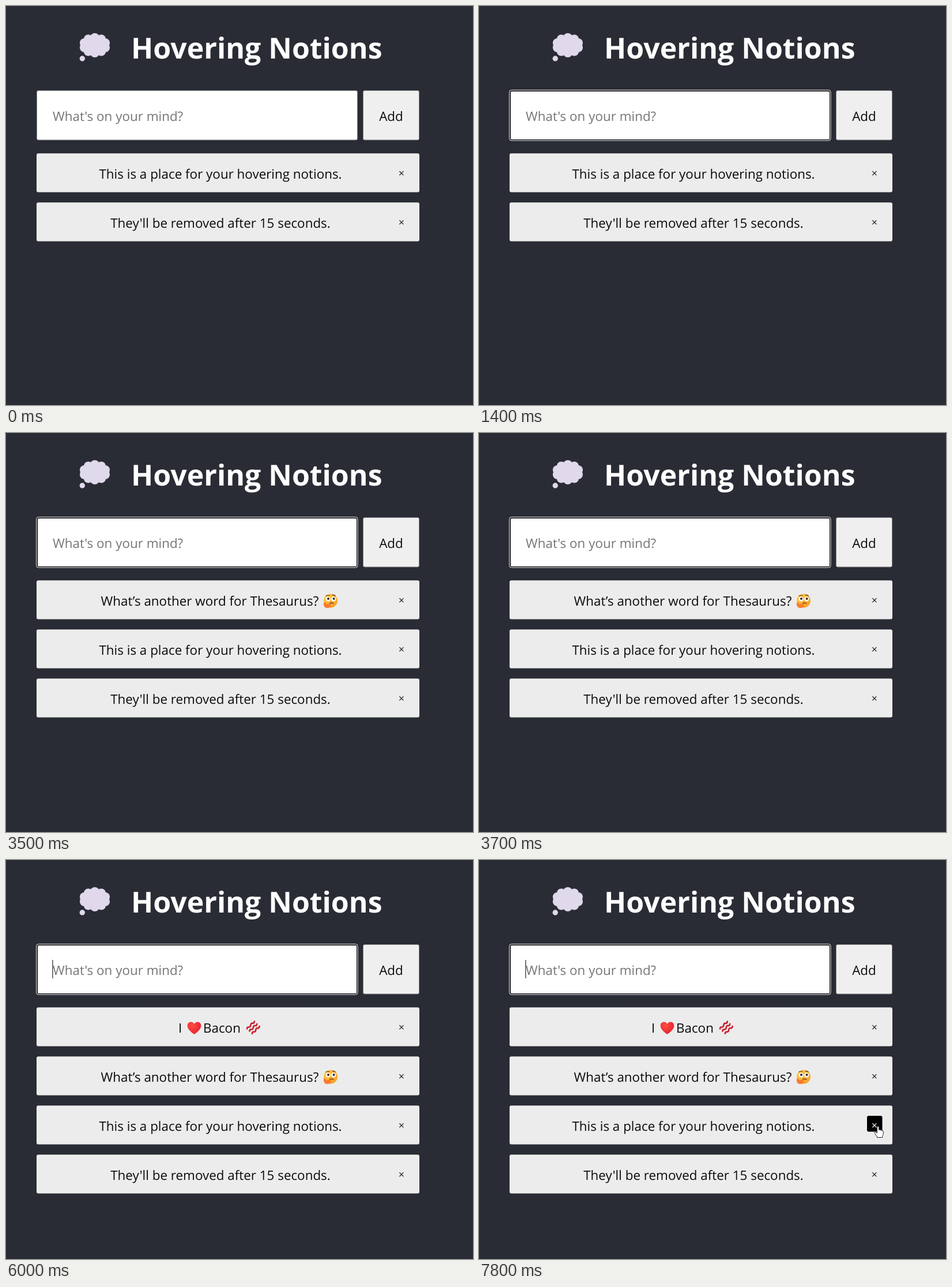
Recreate the animation shown at these times as an HTML page. Size 810 by 691 pixels, loop 8 s.

```html
<!DOCTYPE html>
<html lang="en">
<head>
<meta charset="utf-8">
<title>Hovering Notions</title>
<style>
  html, body { margin: 0; width: 100%; height: 100%; overflow: hidden; background: #2a2c35; }
  svg { display: block; width: 100%; height: 100%; }
  text { font: 22.4px "Open Sans", "Noto Sans", sans-serif; fill: #0b0b0b; text-rendering: geometricPrecision; white-space: pre; }
  .title { font-size: 50px; font-weight: 700; fill: #fff; }
  .hint { fill: #757575; }
  .mid { text-anchor: middle; }
  .close { font-size: 18px; fill: #222; text-anchor: middle; }
  .edge { stroke: #85858a; }
</style>
</head>
<body>
<svg viewBox="0 0 810 691">
  <defs>
    <linearGradient id="skin" x1="0" y1="0" x2="1" y2="1">
      <stop offset="0" stop-color="#ffcf45"/>
      <stop offset="1" stop-color="#f99a24"/>
    </linearGradient>
    <radialGradient id="red" cx=".35" cy=".3" r=".8">
      <stop offset="0" stop-color="#ff4a43"/>
      <stop offset="1" stop-color="#e3202c"/>
    </radialGradient>
    <!-- emoji are centred on 0,0 -->
    <g id="thinking">
      <circle r="12" fill="url(#skin)"/>
      <circle cx="-4.4" cy="-3" r="4" fill="#fff"/>
      <circle cx="5.2" cy="-3" r="4" fill="#fff"/>
      <circle cx="-4" cy="-3.4" r="2" fill="#3a2427"/>
      <circle cx="5.6" cy="-3.4" r="2" fill="#3a2427"/>
      <path d="M-8-8.4Q-5-10.4-2-8.8M3-9.8Q6-11 8.4-8.4M-1.4 4.6Q2 2.6 5 4.8" fill="none" stroke="#5b2f2a" stroke-width="1.2" stroke-linecap="round"/>
      <path d="M-12.2 6Q-12 2.6-10 2.8Q-8.4 3-8 5.6L-.6 5.2Q1.8 5.6.6 7.2L-1.6 8Q1.6 8.6.4 10.6Q-2 12.8-6.4 12.6Q-11.4 12-12.2 6Z" fill="#fb7a2c"/>
    </g>
    <g id="heart">
      <path d="M0 10.8C-5 7.4-11.8 2.4-11.8-4C-11.8-8-9-10.4-5.8-10.4C-3.2-10.4-1-9 0-6.8C1-9 3.2-10.4 5.8-10.4C9-10.4 11.8-8 11.8-4C11.8 2.4 5 7.4 0 10.8Z" fill="url(#red)"/>
    </g>
    <path id="strip" d="M-6.5 6Q-6.5 2.6-3.6 3T-.2-.4T3-3.6T6.2-6.6" fill="none" stroke-linecap="round"/>
    <g id="bacon" stroke="#c8202f" stroke-width="2.7">
      <use href="#strip" x="-4.4" y="-4.2"/>
      <use href="#strip"/>
      <use href="#strip" x="4.4" y="4.2"/>
    </g>
    <g id="question">
      <text>What’s another word for Thesaurus?</text>
      <use href="#thinking" x="398.5" y="-8.5"/>
    </g>
    <g id="breakfast">
      <text x="1">I</text>
      <use href="#heart" x="28.5" y="-8"/>
      <text x="44">Bacon</text>
      <use href="#bacon" x="131" y="-8.5"/>
    </g>
  </defs>

  <rect width="810" height="691" fill="#2a2c35"/>
  <g id="bubble" fill="#e0d8eb">
    <ellipse cx="154" cy="68" rx="20" ry="15"/>
    <circle cx="132.3" cy="91" r="4.7"/>
  </g>
  <text class="title" x="217" y="91">Hovering Notions</text>

  <g id="ring">
    <rect x="52.7" y="145.7" width="557.3" height="87.3" rx="3.5" fill="#101014" stroke="#fff"/>
    <rect x="55" y="148" width="553" height="83" rx="1.5" fill="#fff"/>
  </g>
  <rect id="plain" class="edge" x="53.5" y="146.5" width="556" height="85.5" rx="2.5" fill="#fff"/>
  <text id="hint" class="hint" x="81" y="199">What's on your mind?</text>
  <use id="typedQuestion" href="#question" x="81" y="199"/>
  <use id="typedBreakfast" href="#breakfast" x="81" y="199"/>
  <rect id="caret" y="173" width="1.2" height="32" fill="#222"/>
  <rect class="edge" x="619.5" y="146.5" width="97" height="85.5" rx="2.5" fill="#efefef"/>
  <text class="mid" x="668" y="199">Add</text>

  <g id="rows"></g>
  <g id="hover">
    <rect x="673" y="443" width="26.5" height="27.5" rx="3" fill="#000"/>
    <text class="close" x="686" y="466" style="fill:#fff">×</text>
  </g>
  <path id="arrow" d="M.5.5V16L4 12.7L6.4 18.2L8.8 17.2L6.5 11.8H11.3Z" fill="#fff" stroke="#111"/>
  <path id="hand" d="M-1.6 12V1.2Q0-1 1.6 1.2V6.4Q3.4 5 4.2 7Q6 5.8 6.8 7.8Q8.8 6.8 9.2 9.2V13.6Q9 16 7.6 17.4V19.5H-1.4V18Q-3.6 16-5.8 11.6Q-5.4 9.4-3.4 10.4Z" fill="#fff" stroke="#222"/>
</svg>
<script>
const LOOP = 8000;
const $ = id => document.getElementById(id);

function add(parent, tag, attrs, text = '') {
  const node = document.createElementNS('http://www.w3.org/2000/svg', tag);
  for (const key in attrs) node.setAttribute(key, attrs[key]);
  node.textContent = text;
  return parent.appendChild(node);
}
const show = (node, on) => node.style.visibility = on ? 'visible' : 'hidden';
const move = (node, x, y) => node.setAttribute('transform', `translate(${x} ${y})`);

for (let i = 0; i < 10; i++) {
  const a = (18 + i * 36) * Math.PI / 180;
  add($('bubble'), 'circle', { cx: 154 + 19 * Math.cos(a), cy: 68 + 13 * Math.sin(a), r: 8 });
}

// Newest thought first; each one enters at the top when its time comes.
const thoughts = [
  { from: 6000, href: '#breakfast', x: 298 },
  { from: 3500, href: '#question', x: 164.5 },
  { from: 0, text: 'This is a place for your hovering notions.' },
  { from: 0, text: "They'll be removed after 15 seconds." }
];
for (const item of thoughts) {
  item.node = add($('rows'), 'g', {});
  add(item.node, 'rect', { x: 53, y: 0.3, width: 664, height: 67.3, rx: 3, fill: '#ececec' });
  if (item.href) add(item.node, 'use', { href: item.href, x: item.x, y: 44 });
  else add(item.node, 'text', { class: 'mid', x: 372, y: 44 }, item.text);
  add(item.node, 'text', { class: 'close', x: 686, y: 41 }, '×');
}

// Pointer steps: time, x, y, shape (none hides it)
const pointer = [
  [0], [200, 324, 357, 'arrow'], [300, 316, 324, 'arrow'], [400, 302, 236, 'arrow'],
  [500, 288, 132, 'arrow'], [600, 282, 123, 'arrow'], [700],
  [7400, 740, 477, 'arrow'], [7500, 726, 473, 'arrow'], [7600, 711, 468, 'arrow'],
  [7700, 697, 463, 'hand'], [7800, 692, 461, 'hand']
];

// Input steps: time, content, caret x
const input = [
  [0, 'hint'], [2700, 'typedQuestion', 495], [3200, 'typedQuestion'],
  [3500, 'hint'], [5600, 'typedBreakfast', 227.3], [6000, 'hint', 80.3]
];
const at = (steps, t) => steps.findLast(step => step[0] <= t);

function draw(t) {
  show($('ring'), t >= 900);
  show($('plain'), t < 900);

  const [, content, caretX] = at(input, t);
  for (const id of ['hint', 'typedQuestion', 'typedBreakfast']) show($(id), id === content);
  show($('caret'), caretX);
  if (caretX) $('caret').setAttribute('x', caretX);

  let slot = 0;
  for (const { from, node } of thoughts) {
    show(node, t >= from);
    if (t >= from) move(node, 0, 255 + 85 * slot++);
  }

  const [, x, y, shape] = at(pointer, t);
  for (const id of ['arrow', 'hand']) {
    show($(id), id === shape);
    if (id === shape) move($(id), x, y);
  }
  show($('hover'), shape === 'hand');
}

const start = performance.now();
function tick() {
  draw((performance.now() - start) % LOOP);
  requestAnimationFrame(tick);
}
draw(0);
requestAnimationFrame(tick);
</script>
</body>
</html>
```
